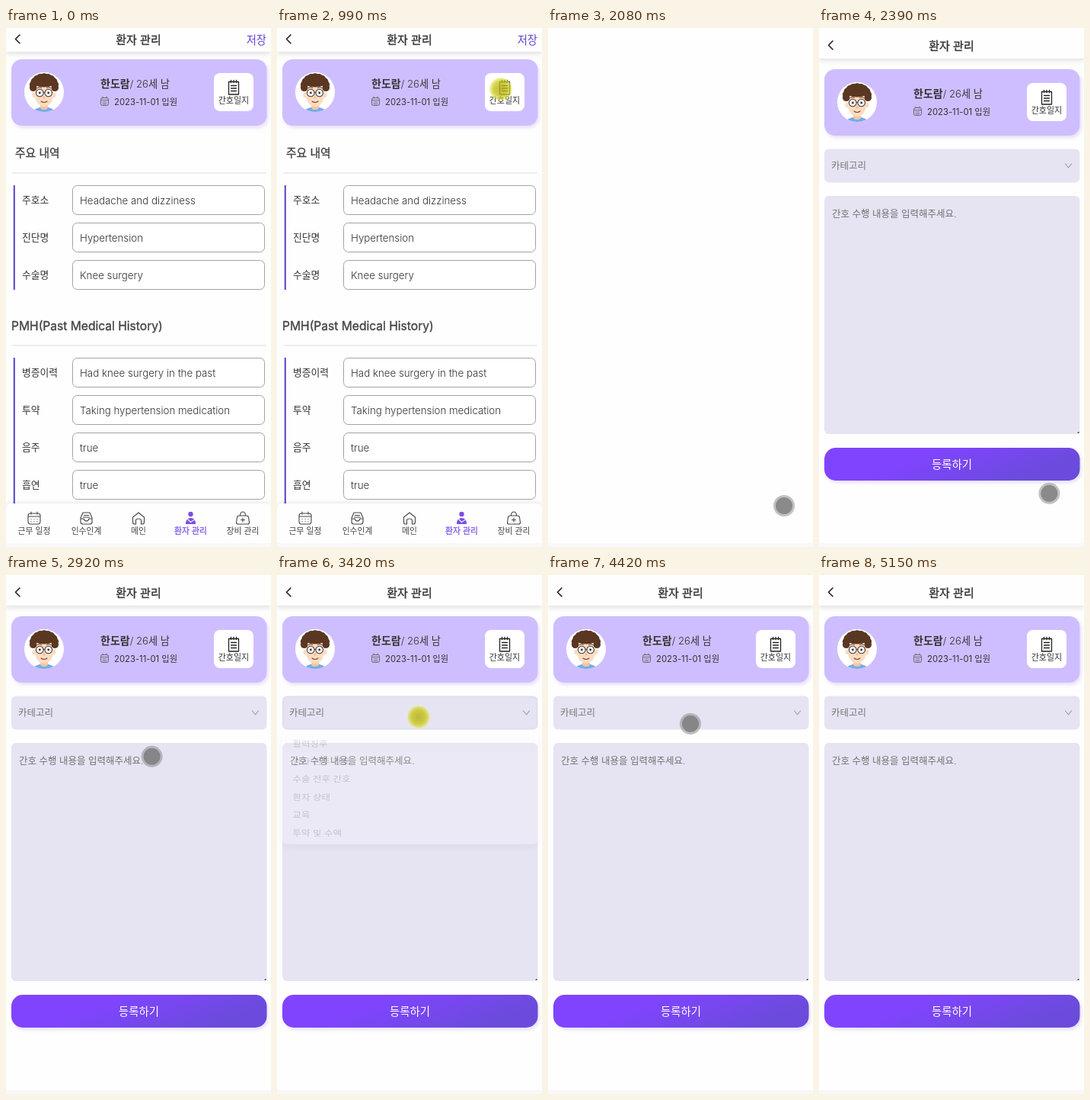
An HTML page for the animation above (5.42 s loop, 348 by 680 pixels).

```html
<!DOCTYPE html>
<html lang="ko">
<head>
<meta charset="utf-8">
<style>
html, body { margin: 0; width: 100%; height: 100%; overflow: hidden; background: #fefefe; }
svg { display: block; width: 348px; height: 680px; }
text { font-family: Inter, "Noto Sans CJK KR", "Noto Sans CJK", sans-serif; white-space: pre; }
.line { fill: none; stroke: #444; stroke-width: 1.1; stroke-linecap: round; stroke-linejoin: round; }
.bar { filter: drop-shadow(0 3px 3px rgba(0,0,0,.11)); }
.card { filter: drop-shadow(2px 3px 2px rgba(150,120,220,.22)); }
.nav { filter: drop-shadow(0 -2px 2px rgba(0,0,0,.07)); }
.menu { filter: drop-shadow(0 5px 7px rgba(0,0,0,.22)); }
</style>
</head>
<body>
<svg id="stage" viewBox="0 0 348 680"></svg>
<script>
const LOOP = 5420;
const PURPLE = '#976cf9';

const rect = (x, y, w, h, r, fill, extra = '') =>
  `<rect x="${x}" y="${y}" width="${w}" height="${h}" rx="${r}" fill="${fill}" ${extra}/>`;
const circle = (x, y, r, fill, extra = '') => `<circle cx="${x}" cy="${y}" r="${r}" fill="${fill}" ${extra}/>`;
const line = (d, extra = '') => `<path class="line" d="${d}" ${extra}/>`;
const shape = (d, fill) => `<path d="${d}" fill="${fill}"/>`;
const each = (list, draw) => list.map(draw).join('');

// y is the optical middle of the line; medium weight is regular with a thin outline
function text(x, y, str, size, { fill = '#333', weight = 400, anchor = 'start' } = {}) {
  const medium = weight == 500;
  const outline = medium ? `stroke="${fill}" stroke-width=".35"` : '';
  return `<text x="${x}" y="${y + size * .37}" font-size="${size}" font-weight="${medium ? 400 : weight}" fill="${fill}" text-anchor="${anchor}" ${outline}>${str}</text>`;
}
const centered = (x, y, str, size, fill, weight) => text(x, y, str, size, { fill, weight, anchor: 'middle' });

const backArrow = (y, color) => line(`M18 ${y - 5.5}l-5.5 5.5 5.5 5.5`, `style="stroke:${color};stroke-width:1.6"`);

const topBar = (height, y) =>
  rect(0, 0, 348, height, 0, '#fefefe', 'class="bar"') + backArrow(y, '#222') +
  centered(174, y + .8, '환자 관리', 15, '#333', 500);

function avatar() {
  const hair = '#5a3722', skin = '#fcdcc0';
  let curls = '';
  for (let i = 0; i <= 10; i++) {
    const a = Math.PI * (1.06 - i * .112);
    curls += circle(50 + 14.5 * Math.cos(a), 76 - 12 * Math.sin(a), 4.8, hair);
  }
  return circle(50, 84, 26, '#fff') + `<g clip-path="url(#face)">` +
    `<ellipse cx="50" cy="111" rx="15" ry="7.5" fill="#74abe8"/>` + rect(45, 98, 10, 9, 4, '#f3c6a2') +
    circle(37.5, 88, 3.2, skin) + circle(62.5, 88, 3.2, skin) +
    `<ellipse cx="50" cy="87.5" rx="12" ry="15.5" fill="${skin}"/>` +
    `<ellipse cx="50" cy="70" rx="15.5" ry="7.5" fill="${hair}"/>` + curls +
    each([44.3, 55.7], x => circle(x, 85, 4.8, '#fff', 'stroke="#473a3a" stroke-width="1.1"') +
      circle(x, 85, 1.4, '#333')) +
    line('M49 84.500h2M41.500 78.500q3-1.500 5 0M53.500 78.500q3-1.500 5 0M46 96q4 3 8 0', 'style="stroke:#7a4430"') +
    circle(50, 91, 1.5, '#efb995') + '</g>';
}

const patientCard = dy => `<g transform="translate(0 ${dy})">` +
  rect(7, 41, 335.5, 87, 14, '#cfbeff', 'class="card"') + avatar() +
  text(124, 73, '한도람<tspan font-size="13.2" font-weight="300">/ 26세 남</tspan>', 14, { weight: 600 }) +
  rect(124.5, 91.5, 10, 10, 2, 'none', 'stroke="#666"') +
  line('M124.5 94.5h10M127 90v2M132 90v2M127 97h5M127 99.5h5', 'style="stroke:#666;stroke-width:.9"') +
  text(142, 96.5, '2023-11-01 입원', 11.3) +
  rect(273, 59, 52, 50, 8, '#fff') +
  line('M292.5 70.5h13v16.5h-13zM295.5 75.5h7M295.5 79h7M295.5 82.5h7M295.5 68.5v3M299 68.5v3M302.5 68.5v3', 'style="stroke:#222;stroke-width:1.3"') +
  centered(299, 95, '간호일지', 11) + '</g>';

function section(title, size, x, y, rows, barHeight) {
  return text(x, y, title, size, { fill: '#444', weight: 500 }) +
    rect(8, y + 25.5, 334, 1, 0, '#e0e0e0') + rect(9.7, y + 42, 2.2, barHeight, 0, '#6450cc') +
    each(rows, ([label, value], i) => {
      const top = y + 42.5 + 49 * i;
      return rect(87.5, top, 252, 38, 6, '#fff', 'stroke="#a3a3a3"') +
        text(21, top + 19, label, 12.8) + text(97, top + 19.3, value, 13.3, { weight: 300 });
    });
}

function navBar() {
  const labels = ['근무 일정', '인수인계', '메인', '환자 관리', '장비 관리'];
  return rect(0, 623, 348, 60, 6, '#fefefe', 'class="nav"') +
    line('M32 636h10q3 0 3 3v7q0 4-3 4H32q-3 0-3-4v-7q0-3 3-3zM29 640h16M33 634v3M41 634v3M33 643.5h.1M37 643.5h.1M41 643.5h.1M33 646.5h.1M37 646.5h.1M41 646.5h.1') +
    line('M101 635h9l3 7v5q0 3-3 3h-9q-3 0-3-3v-5zM98 643h4q1 3 3.500 3t3.500-3h4M102.500 638.500h6M101.500 641h8') +
    line('M170.500 650h-2q-2 0-2-3v-6l7.500-6 7.500 6v6q0 3-2 3h-2v-5q0-2-3.500-2t-3.500 2z') +
    circle(242.5, 637, 3.2, '#7950dc') + shape('M236 650q0-8 6.500-8t6.500 8z', '#7950dc') +
    line('M238.500 643.500l4 4 5-3.500', 'style="stroke:#e6dcff;stroke-width:1.4"') +
    line('M306 639h10q2 0 2.500 2l1 7q0 2-2 2h-13q-2 0-2-2l1-7q.5-2 2.500-2zM307.500 639q0-5 3.500-5t3.500 5M311 642v5M308.500 644.500h5') +
    each(labels, (s, i) => centered(37 + 68.5 * i, 659, s, 10.8, i == 3 ? '#895fee' : '#444', i == 3 ? 500 : 400));
}

function patientPage() {
  return topBar(31, 14.5) + text(342, 15.5, '저장', 14.3, { fill: '#6540d0', anchor: 'end' }) + patientCard(0) +
    section('주요 내역', 14.8, 12, 164, [['주호소', 'Headache and dizziness'], ['진단명', 'Hypertension'], ['수술명', 'Knee surgery']], 137) +
    section('PMH(Past Medical History)', 15.6, 7, 390, [['병증이력', 'Had knee surgery in the past'],
      ['투약', 'Taking hypertension medication'], ['음주', 'true'], ['흡연', 'true']], 195) + navBar();
}

function journalPage() {
  const days = ['SAT', 'SUN', 'MON', 'TUE', 'WED', 'THU', 'FRI'];
  const tags = {
    '검사 전후 간호': [78, '#fff0c6'], '투약 및 수액': [68, '#cdbdf9'], '환자 상태': [57, '#fbd3d4']
  };
  const notes = [
    ['01:19', 65, '초음파 검사 결과 12시간 금식 후 수술 필요', '검사 전후 간호', '류가온'],
    ['08:48', 71, 'V/S q6hr SBP 90 미만 노티', '투약 및 수액', '모나율'],
    ['08:55', 70, 'HTN medication 중단', '투약 및 수액', '모나율'],
    ['09:10', 68, '기력 저하로 비타민 투약이 필요함', '환자 상태', '모나율'],
    ['10:11', 63, '비타민 투역 완료', '검사 전후 간호', '류가온']
  ];
  return rect(0, -20, 348, 168, 9, PURPLE) + backArrow(22, '#fff') +
    centered(174, 23.5, '간호 일지', 15, '#fff', 600) + centered(174.5, 56.5, '2023.11', 14.2, '#fff', 500) +
    each([[130, -1], [218, 1]], ([x, dir]) => circle(x, 56.5, 5.5, '#d9c9fd') +
      line(`M${x - 2.5} 56.5h5M${x + dir * .5} 54.500l${dir * 2} 2 ${-dir * 2} 2`, `style="stroke:${PURPLE}"`)) +
    rect(151.5, 76.5, 44, 61, 10, '#f0eafd') +
    each(days, (day, i) => {
      const x = -2 + 58.2 * i, picked = i == 3, color = picked ? '#444' : '#fff';
      return `<g opacity="${i % 6 ? 1 : .65}">` + centered(x, 91.5, day, 10, color, picked ? 400 : 600) +
        centered(x, 111, 18 + i, picked ? 16.5 : 14.5, color, picked ? 300 : 500) + '</g>';
    }) +
    rect(12, 148, 2, 527, 0, '#8464cc') +
    each(notes, ([time, x, note, tag, nurse], i) => {
      const y = 161 + 90.5 * i, [width, color] = tags[tag];
      return circle(13.5, y + 14, 7, '#946af6') + text(25, y + 14, time, 12.5) +
        rect(x, y, 279, 69, 8, '#f9f6fe', 'class="card"') + text(x + 9, y + 18.3, note, 11.4) +
        rect(x + 9, y + 34.5, 262, 1.8, 0, '#cfc3f6') + rect(x + 9, y + 43, width, 17, 8, color) +
        centered(x + 9 + width / 2, y + 51.5, tag, 9.8, '#444') +
        text(x + 269, y + 51.5, nurse + ' 간호사', 9.8, { fill: '#777', weight: 300, anchor: 'end' });
    }) +
    circle(303.5, 624, 25.3, PURPLE) +
    shape('M293 634v-5l13-13 5 5-13 13zM307.500 614.500l2.500-2.500 5 5-2.500 2.500z', '#fff') +
    line('M297 613v8M293 617h8', 'style="stroke:#fff;stroke-width:2"');
}

function formPage() {
  const options = ['활력징후', '검사 전후 간호', '수술 전후 간호', '환자 상태', '교육', '투약 및 수액'];
  return topBar(40, 22.5) + patientCard(13) +
    rect(7, 158.5, 335.5, 44, 6, '#e6e4f3') +
    rect(8, 159.5, 333.5, 42, 5.5, 'none', 'id="focus" stroke="#cfcde0" stroke-width="2.5"') +
    text(16, 180.5, '카테고리', 12.5, { fill: '#777', weight: 300 }) +
    line('M323.500 178l4 5 4-5', 'style="stroke:#999"') +
    rect(7, 220, 335.5, 312, 6, '#e6e4f3') + shape('M341.500 528.500v2.500h-2.500z', '#333') +
    text(17, 243, '간호 수행 내용을 입력해주세요.', 12.5, { fill: '#707070', weight: 300 }) +
    rect(7, 550, 335.5, 43, 15, 'url(#button)', 'class="card"') +
    centered(174.5, 572, '등록하기', 14.4, '#fff') +
    '<g id="menu">' + rect(7, 206, 335.5, 175, 6, '#fff', 'class="menu"') + rect(10, 210, 329, 27.5, 3, '#f4f4f4') +
    each(options, (s, i) => text(20.5, 223.5 + 28 * i, s, 12.5, { weight: 300 })) + '</g>';
}

const stage = document.getElementById('stage');
stage.innerHTML = `<defs>
  <clipPath id="face"><circle cx="50" cy="84" r="26"/></clipPath>
  <linearGradient id="button" x2="1" y2=".35"><stop offset=".4" stop-color="#8044ff"/><stop offset="1" stop-color="#6b4bdb"/></linearGradient>
  <radialGradient id="glow"><stop stop-color="#b5ac0e" stop-opacity=".82"/><stop offset=".6" stop-color="#c6c51a" stop-opacity=".78"/>
    <stop offset=".85" stop-color="#dfe04c" stop-opacity=".65"/><stop offset="1" stop-color="#f0f090" stop-opacity="0"/></radialGradient></defs>` +
  rect(0, 0, 348, 680, 0, '#fefefe') +
  `<g id="patient">${patientPage()}</g><g id="journal">${journalPage()}</g><g id="form">${formPage()}</g>` +
  rect(0, 675, 348, 5, 0, '#f8f8fb') +
  `<g id="cursor"><g id="pointer">${circle(0, 0, 14, 'rgba(128,128,128,.48)')}${circle(0, 0, 11, 'rgba(112,112,112,.68)')}</g>` +
  circle(0, 0, 16, 'url(#glow)', 'id="press"') + '</g>';

const part = Object.fromEntries([...stage.querySelectorAll('g[id], #press, #focus')].map(el => [el.id, el]));
const show = (el, visible) => { el.style.display = visible ? '' : 'none'; };
const progress = (t, from, to) => Math.min(1, Math.max(0, (t - from) / (to - from)));
const smooth = p => p * p * (3 - 2 * p);
const within = (t, from, to) => t >= from && t < to;

// start, end, x, y, sideways bend
const moves = [
  [500, 740, 294, 80, 0], [1130, 1655, 310, 626, -104], [2300, 3090, 186, 186, -87],
  [3880, 4300, 187, 195, 0], [4450, 5050, 341, 675, 0], [5040, 5150, 362, 696, 0]
];
const presses = [[990, 1130], [1730, 1870], [3350, 3470], [4090, 4220]];

function cursorAt(t) {
  let x = 328, y = 110;
  for (const [from, to, endX, endY, bend] of moves) {
    const f = smooth(progress(t, from, to));
    x += (endX - x) * f + bend * f * (1 - f);
    y += (endY - y) * f;
  }
  return [x, y];
}

function draw(t) {
  show(part.patient, t < 1130);
  show(part.journal, within(t, 1240, 1900));
  show(part.form, t >= 2190);
  part.form.style.opacity = progress(t, 2190, 2360);

  const closing = progress(t, 4220, 4410);
  const open = (1 - (1 - progress(t, 3400, 3610)) ** 2) * (1 - closing * closing);
  show(part.menu, open > 0);
  part.menu.style.opacity = open;
  part.menu.setAttribute('transform', `translate(0 206) scale(1 ${.8 + .2 * open}) translate(0 -206)`);
  part.focus.style.opacity = open;

  const pressed = presses.some(([from, to]) => within(t, from, to));
  show(part.cursor, within(t, 530, 5150));
  show(part.pointer, !pressed);
  show(part.press, pressed);
  part.cursor.setAttribute('transform', `translate(${cursorAt(t)})`);
}

const start = performance.now();
function loop() {
  draw((performance.now() - start) % LOOP);
  requestAnimationFrame(loop);
}
loop();
</script>
</body>
</html>
```
